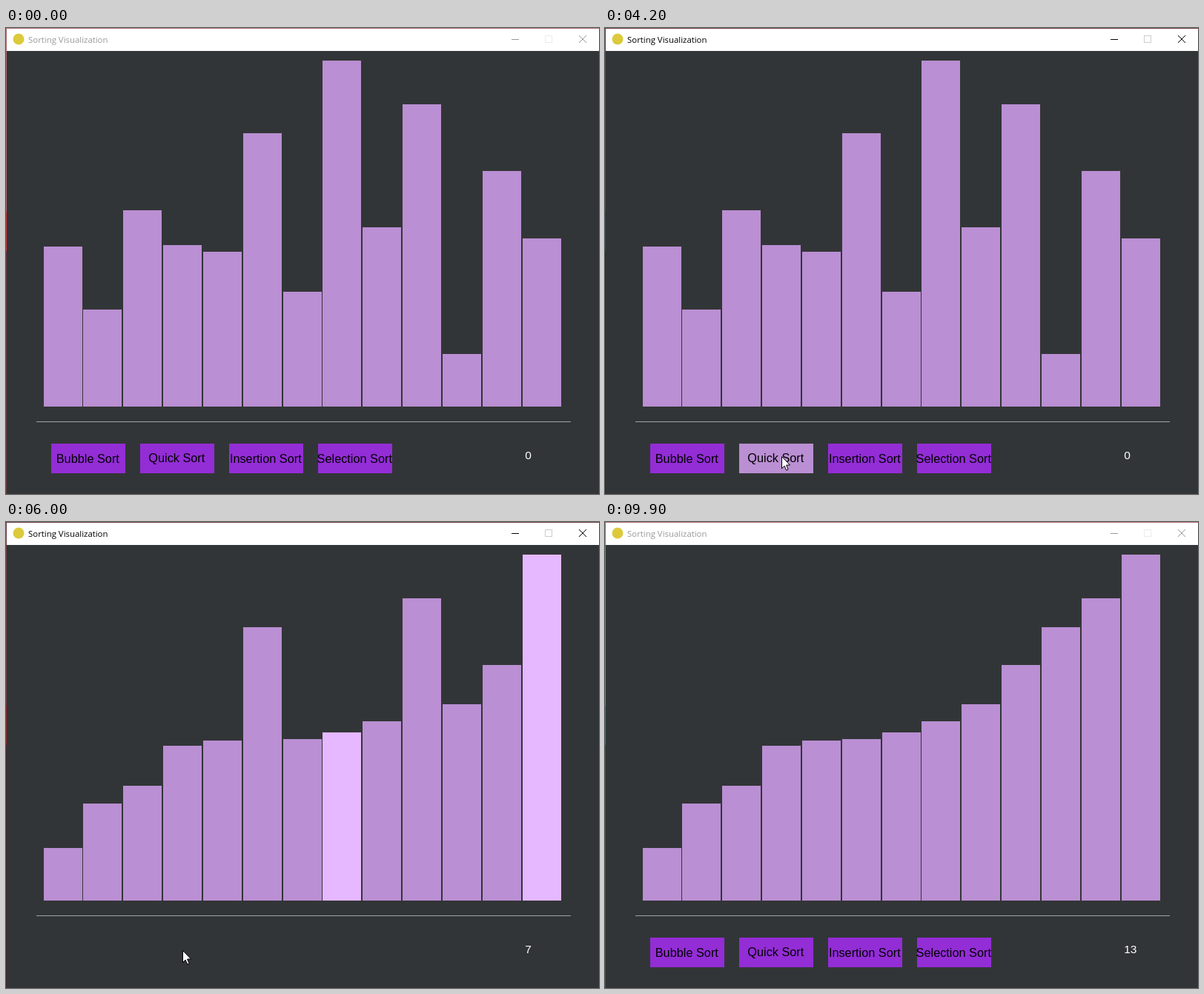
An HTML page with a canvas for the animation above (10 s loop, 800 by 629 pixels).

```html
<!DOCTYPE html>
<html lang="en">
<head>
<meta charset="utf-8">
<title>Sorting Visualization</title>
<style>
  html, body { margin: 0; width: 100%; height: 100%; overflow: hidden; background: #323537; }
  canvas { display: block; }
</style>
</head>
<body>
<canvas id="stage" width="800" height="629"></canvas>
<script>
const ctx = document.getElementById('stage').getContext('2d');
const LOOP = 10000;
const BASE = 511;
const HEIGHTS = [216, 131, 265, 218, 209, 369, 155, 467, 242, 408, 71, 318, 227];
const STEP_TIMES = [4600, 4800, 5000, 5200, 5400, 5600, 5800, 6000, 6300, 6400, 6600, 6800, 7100];
const BUTTONS = [['Bubble Sort', 61, 587], ['Quick Sort', 181, 586],
                 ['Insertion Sort', 301, 587], ['Selection Sort', 421, 587]];
const COLOR = { back: '#323537', bar: '#ba8fd3', lit: '#e5b8ff', button: '#932dd6', rule: '#a0a2a3' };

// Runs a quicksort and records each state that gets drawn.
function recordSort(values) {
  const a = values.slice(), steps = [];
  let count = 0;
  const show = (...lit) => steps.push({ bars: a.slice(), lit, count });
  const swap = (i, j) => { [a[i], a[j]] = [a[j], a[i]]; count++; };

  function sort(start, end) {
    if (start >= end) return;
    const pivot = a[start];
    let low = start + 1, high = end;
    if (low < high) show(start, end);
    while (true) {
      while (low <= high && a[high] >= pivot) high--;
      while (low <= high && a[low] <= pivot) low++;
      if (low > high) break;
      swap(low, high);
      show(low, high);
    }
    swap(start, high);
    if (end - start === 1) show();
    sort(start, high - 1);
    sort(high + 1, end);
  }

  sort(0, a.length - 1);
  return steps;
}

const idle = { bars: HEIGHTS, lit: [], count: 0 };
const steps = recordSort(HEIGHTS);

function stateAt(t) {
  const n = STEP_TIMES.filter(s => s <= t).length;
  return n ? steps[n - 1] : idle;
}

function bezier(p, u) {
  const v = 1 - u;
  const w = [v * v * v, 3 * v * v * u, 3 * v * u * u, u * u * u];
  return [0, 1].map(k => Math.round(p.reduce((sum, q, i) => sum + q[k] * w[i], 0)));
}

function pointerAt(t) {
  if (t < 800 || t >= 9100) return null;
  if (t < 1800) return bezier([[15, 1], [90, 50], [175, 120], [231, 224]], (t - 800) / 1000);
  if (t < 2900) return bezier([[231, 224], [264, 340], [266, 540], [238, 572]], (t - 1800) / 1100);
  if (t < 3000) return [238, 572];
  if (t < 3900) return [238, 574];
  if (t < 4000) return [238, 576];
  if (t < 8200) return [238, 578];
  return bezier([[244, 528], [292, 370], [255, 170], [105, 1]], (t - 8200) / 800);
}

function rect(color, x, y, w, h) {
  ctx.fillStyle = color;
  ctx.fillRect(x, y, w, h);
}

function text(str, x, y, color, font, align = 'left') {
  ctx.fillStyle = color;
  ctx.font = font;
  ctx.textAlign = align;
  ctx.fillText(str, x, y);
}

function drawWindow(active) {
  rect(COLOR.back, 0, 0, 800, 629);
  rect('#ffffff', 1, 1, 799, 30);
  rect(active ? '#6a3a3d' : '#ad6b70', 0, 0, 800, 1);
  rect(active ? '#6a3f42' : '#a8686c', 0, 1, 1, 247);
  rect(active ? '#8a2024' : '#c8393c', 0, 248, 1, 53);
  rect(active ? '#3c2528' : '#66383b', 0, 301, 1, 328);

  ctx.fillStyle = '#dcca3c';
  ctx.beginPath();
  ctx.arc(17, 15, 7.5, 0, Math.PI * 2);
  ctx.fill();

  const ink = active ? '#000000' : '#999999';
  text('Sorting Visualization', 30, 20, ink, '11.4px "Open Sans", "Noto Sans", sans-serif');
  rect(ink, 682, 15, 10, 1);
  ctx.lineWidth = 1;
  ctx.strokeStyle = active ? '#cccccc' : '#ebebeb';
  ctx.strokeRect(727.5, 10.5, 9, 9);
  ctx.strokeStyle = ink;
  ctx.beginPath();
  ctx.moveTo(773, 10);
  ctx.lineTo(783, 20);
  ctx.moveTo(783, 10);
  ctx.lineTo(773, 20);
  ctx.stroke();
}

function drawBars({ bars, lit, count }) {
  bars.forEach((h, i) => {
    const x = Math.floor(51 + i * 700 / bars.length);
    rect(lit.includes(i) ? COLOR.lit : COLOR.bar, x, BASE - h, 52, h);
  });
  rect(COLOR.rule, 41, 531, 721, 1);
  text(count, 700.2, 582, '#ffffff', '15.5px "Liberation Sans", Arial, sans-serif');
}

function drawButtons(pressed) {
  BUTTONS.forEach(([label, x, y], i) => {
    rect(pressed && i === 1 ? COLOR.bar : COLOR.button, x, 561, 100, 40);
    text(label, x + 49.3, y, '#000000', '16.3px "Liberation Sans", Arial, sans-serif', 'center');
  });
}

function drawPointer([x, y]) {
  const shape = [[0, 0], [0, 16], [3.6, 12.6], [6.2, 18.4], [8.6, 17.3], [6.1, 11.6], [11, 11.4]];
  ctx.beginPath();
  shape.forEach(([dx, dy]) => ctx.lineTo(x + 0.5 + dx, y + 0.5 + dy));
  ctx.closePath();
  ctx.fillStyle = '#ffffff';
  ctx.fill();
  ctx.lineWidth = 1;
  ctx.strokeStyle = '#000000';
  ctx.stroke();
}

function draw(now) {
  const t = Math.floor((now % LOOP) / 100) * 100;
  drawWindow(t >= 3500 && t < 9900);
  drawBars(stateAt(t));
  if (t < 4600 || t >= 7100) drawButtons(t >= 4200 && t < 4600);
  const pointer = pointerAt(t);
  if (pointer) drawPointer(pointer);
}

const began = performance.now();
function tick() {
  draw(performance.now() - began);
  requestAnimationFrame(tick);
}
tick();
</script>
</body>
</html>
```
